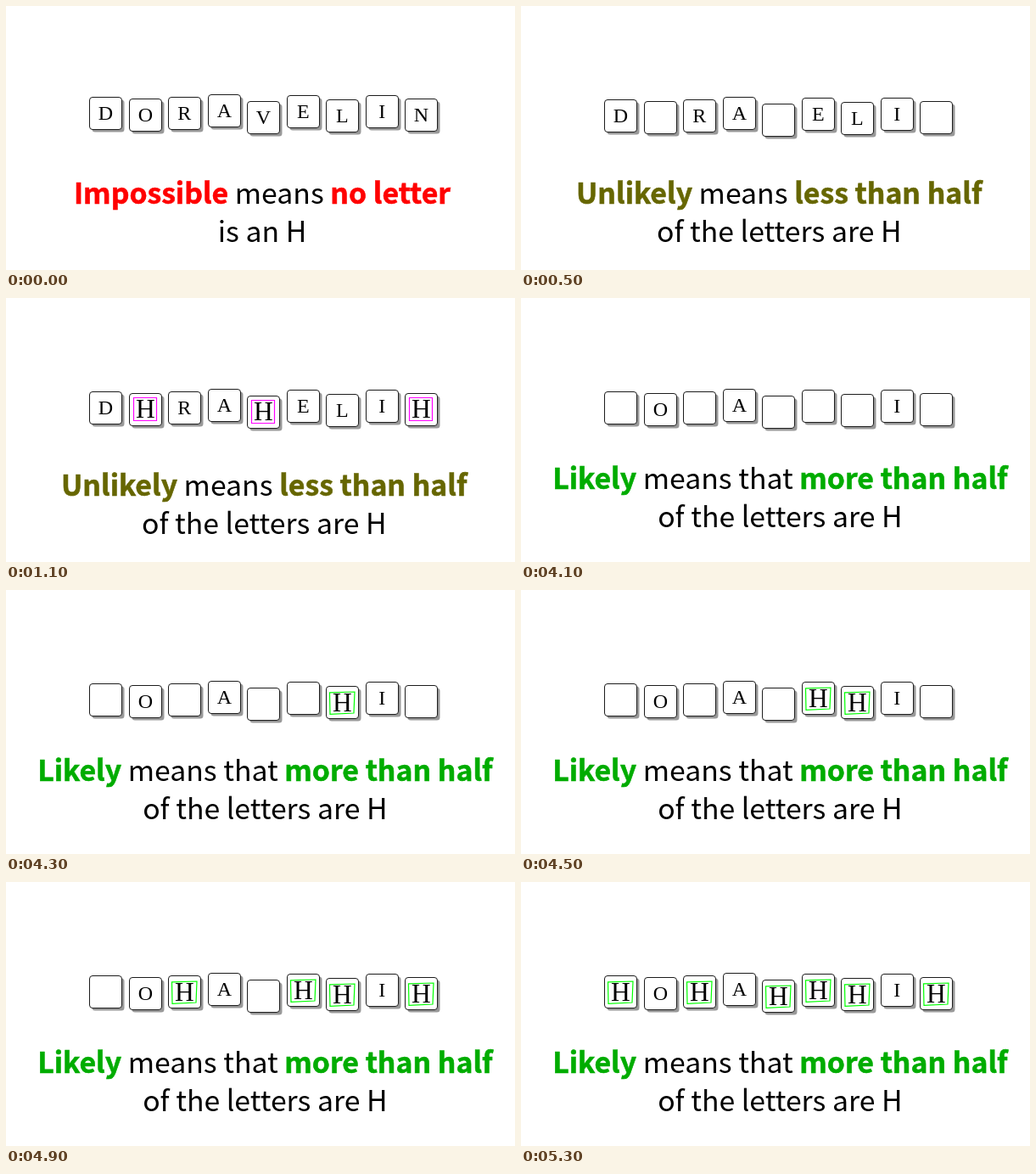
These frames come from a looping animation (600 px wide and 311 px high, 8000 ms). An HTML page:

```html
<!DOCTYPE html>
<html lang="en">
<head>
<meta charset="utf-8">
<title>Letter chances</title>
<style>
  html, body { margin: 0; width: 100%; height: 100%; overflow: hidden; background: #fff; }
  svg { display: block; width: 100%; height: 100%; }
  text { text-anchor: middle; fill: #000; }
  .words { font: 33.8px "Noto Sans CJK SC", "Noto Sans CJK JP", "Noto Sans CJK KR", "Open Sans", sans-serif; }
  .strong { font-weight: 700; stroke-width: 0.6; }
  .letter { font: 24px "Liberation Serif", "Times New Roman", serif; }
  .big { font: 31.5px "Liberation Serif", "Times New Roman", serif; }
  .shadow { fill: #999; }
  .tile { fill: #fff; stroke: #1c1c1c; }
  .frame { fill: none; stroke-width: 1.2; }
</style>
</head>
<body>
<svg id="stage" viewBox="0 0 600 311"></svg>
<script>
const LOOP = 8000, STEP = 200;
const NAME = "DORAVELIN";
const JITTER = [0, 2, 0, -3, 5, -2, 3, -2, 2];
const LEFT = 98, TOP = 107, PITCH = 46.5, SIZE = 38, LINE = 45;

// Each tile listed in "order" is blanked, then gets an H, one per step.
// Words between asterisks are bold; "frame" is a path relative to the tile.
const scenes = [
  {
    start: 0, drop: 0, color: "#f00", order: [], x: 302, y: 233,
    lines: ["*Impossible* means *no letter*", "is an H"]
  },
  {
    start: 500, drop: 3, color: "#660", order: [1, 4, 8], x: 304.3, y: 233,
    lines: ["*Unlikely* means *less than half*", "of the letters are H"],
    ink: "#f0f", frame: "M5.5 5.5h27v27h-27z", base: 29
  },
  {
    start: 4100, drop: 3, color: "#00ac00", order: [6, 5, 2, 8, 0, 4], x: 305.4, y: 225,
    lines: ["*Likely* means that *more than half*", "of the letters are H"],
    ink: "#0f0", frame: "M4.5 7.8L34 7L33 32L5 33.3z", base: 30
  }
];

const stage = document.getElementById("stage");

const box = (offset, cls) =>
  `<rect x="${offset}" y="${offset}" width="${SIZE}" height="${SIZE}" rx="3.5" class="${cls}"/>`;

const letter = (s, y, cls) => `<text x="19.3" y="${y}" class="${cls}">${s}</text>`;

function tile(i, scene, count) {
  const x = Math.round(LEFT + PITCH * i), y = TOP + JITTER[i] + scene.drop;
  const turn = scene.order.indexOf(i);
  let face = "";
  if (turn < 0) face = letter(NAME[i], 27, "letter");
  else if (turn < count) {
    face = `<path d="${scene.frame}" class="frame" stroke="${scene.ink}"/>` + letter("H", scene.base, "big");
  }
  return `<g transform="translate(${x} ${y})">${box(3.5, "shadow")}${box(0.5, "tile")}${face}</g>`;
}

function line(s, row, scene) {
  const bold = `<tspan class="strong" fill="${scene.color}" stroke="${scene.color}">$1</tspan>`;
  return `<text x="${scene.x}" y="${scene.y + LINE * row}" class="words">${s.replace(/\*(.+?)\*/g, bold)}</text>`;
}

function draw(scene, count) {
  stage.innerHTML =
    [...NAME].map((_, i) => tile(i, scene, count)).join("") +
    scene.lines.map((s, row) => line(s, row, scene)).join("");
}

let last = "";
function tick() {
  const t = performance.now() % LOOP;
  const scene = scenes.filter(s => s.start <= t).pop();
  const count = Math.min(scene.order.length, Math.floor((t - scene.start) / STEP));
  const key = scene.start + ":" + count;
  if (key !== last) {
    draw(scene, count);
    last = key;
  }
  requestAnimationFrame(tick);
}
tick();
</script>
</body>
</html>
```
